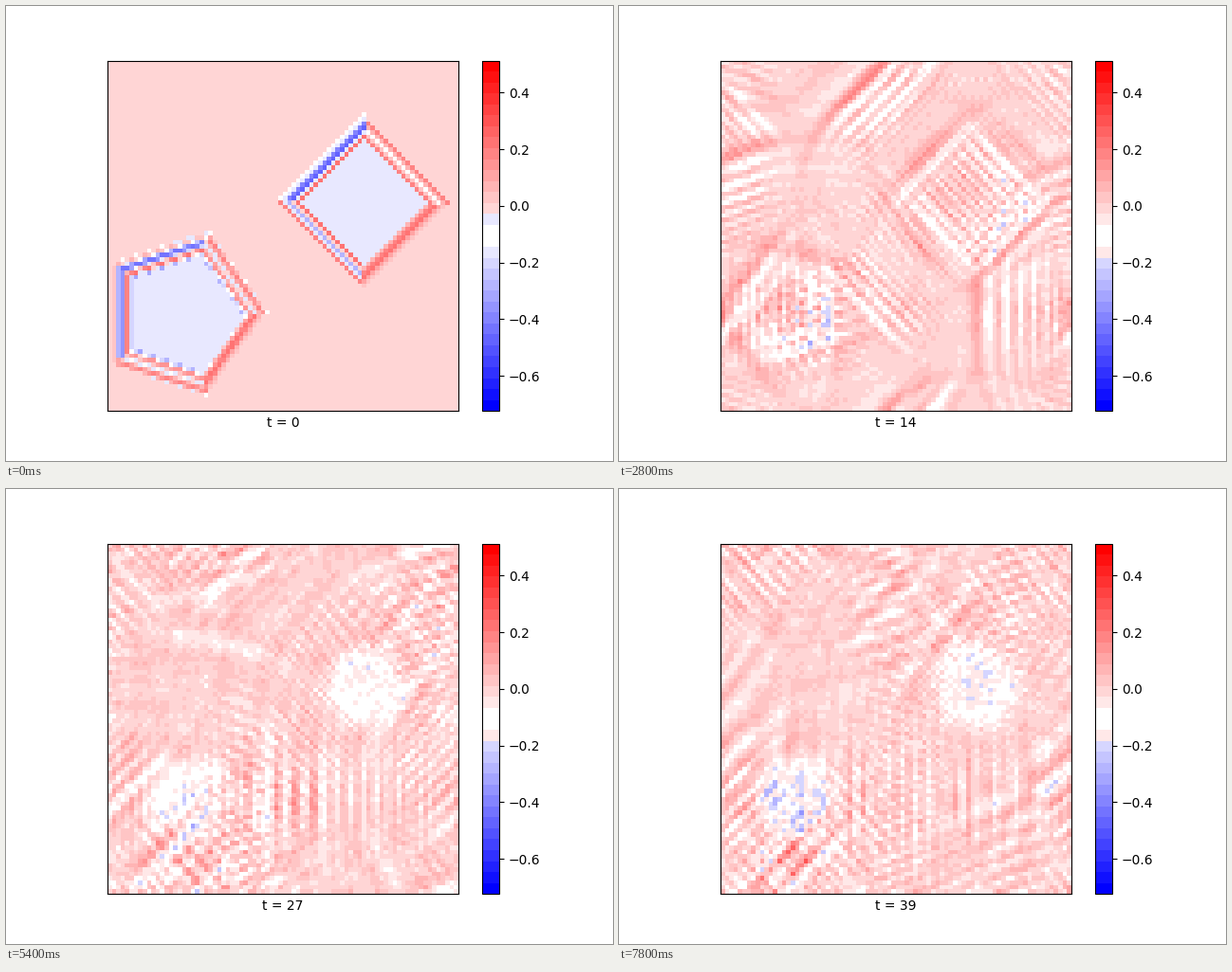
Recreate the animation shown at these times as a matplotlib script. Size 640 by 480 pixels, loop 8000 ms.

```python
import numpy as np
import matplotlib.pyplot as plt
from matplotlib.animation import FuncAnimation
from matplotlib.colors import ListedColormap

N = 80
FRAMES = 40
SPEED, MASS = 2.05, 0.48
LOW, HIGH = -0.7235, 0.5125
INSIDE, HOLLOW = -0.165, -0.16
WIND = 145  # direction the waves are pushed from, in degrees


def bump(s, center, width):
    return np.exp(-((s - center) / width) ** 2)


def polygon(cx, cy, radius, sides):
    """Start value, start velocity and resting hollow of a regular polygon."""
    row, col = np.mgrid[:N, :N]
    x, y = col - cx, cy - row
    angles = (np.arange(sides) + 0.5) * 360 / sides
    rad = np.radians(angles)[:, None, None]
    dist = x * np.cos(rad) + y * np.sin(rad) - radius * np.cos(np.pi / sides)
    s = dist.max(axis=0)
    wind = np.cos(np.radians(angles - WIND))[dist.argmax(axis=0)]

    ripple = 0.22 * np.cos(2 * np.pi * (s + 0.9) / 2.8) * np.minimum(1, 1 + wind)
    swell = -(0.33 * wind + 0.1 * wind ** 2) * bump(s, 0.8 + 0.5 * wind, 1)
    value = np.where(abs(s - 0.4) < 2.5, ripple + swell, 0)
    value += INSIDE * (s < -1.1)
    rate = (0.15 * wind + 0.18) * bump(s, 0.5, 2) + 0.04 * (s < 0)
    hollow = HOLLOW * np.exp(-(np.hypot(x, y) / 9) ** 4)
    return np.array([value, rate, hollow])


def banded(middle):
    """Blue to red in 32 bands, the palest ones merged into white and a tint."""
    colors = plt.get_cmap("bwr", 32)(np.arange(32))
    colors[[15, 16]] = 1
    colors[[14, 17], :3] = middle
    return ListedColormap(colors)


shapes = polygon(58, 32, 16.26, 4) + polygon(16.5, 57.4, 16.3, 5)
value_hat, rate_hat = np.fft.fft2(shapes[:2])

# Wave equation on a periodic lattice; long waves oscillate in place and fade
bend = 4 * np.sin(np.pi * np.fft.fftfreq(N)) ** 2
bend = bend[:, None] + bend
long = np.exp(-bend / 0.15)
omega = np.sqrt(SPEED ** 2 * bend + MASS ** 2 * long)


def field(t):
    wave = value_hat * np.cos(omega * t) + rate_hat * np.sin(omega * t) / omega
    wave = np.fft.ifft2(wave * np.exp(-0.08 * t * long)).real
    rise = np.clip((t - 11) / 6, 0, 1)
    return wave + rise ** 2 * (3 - 2 * rise) * shapes[2]


pale = 232 / 255
FIRST = banded((pale, pale, 1))
LATER = banded((1, pale, pale))

fig, ax = plt.subplots(figsize=(6.4, 4.8), dpi=100)
image = ax.imshow(field(0), cmap=FIRST, vmin=LOW, vmax=HIGH,
                  interpolation="nearest")
fig.colorbar(image)
ax.set_xticks([])
ax.set_yticks([])
label = ax.set_xlabel("t = 0")


def update(t):
    image.set_cmap(FIRST if t == 0 else LATER)
    image.set_data(field(t))
    label.set_text(f"t = {t}")
    return image, label


anim = FuncAnimation(fig, update, frames=FRAMES, interval=200,
                     repeat=True, repeat_delay=0, blit=False)
plt.show()
```
